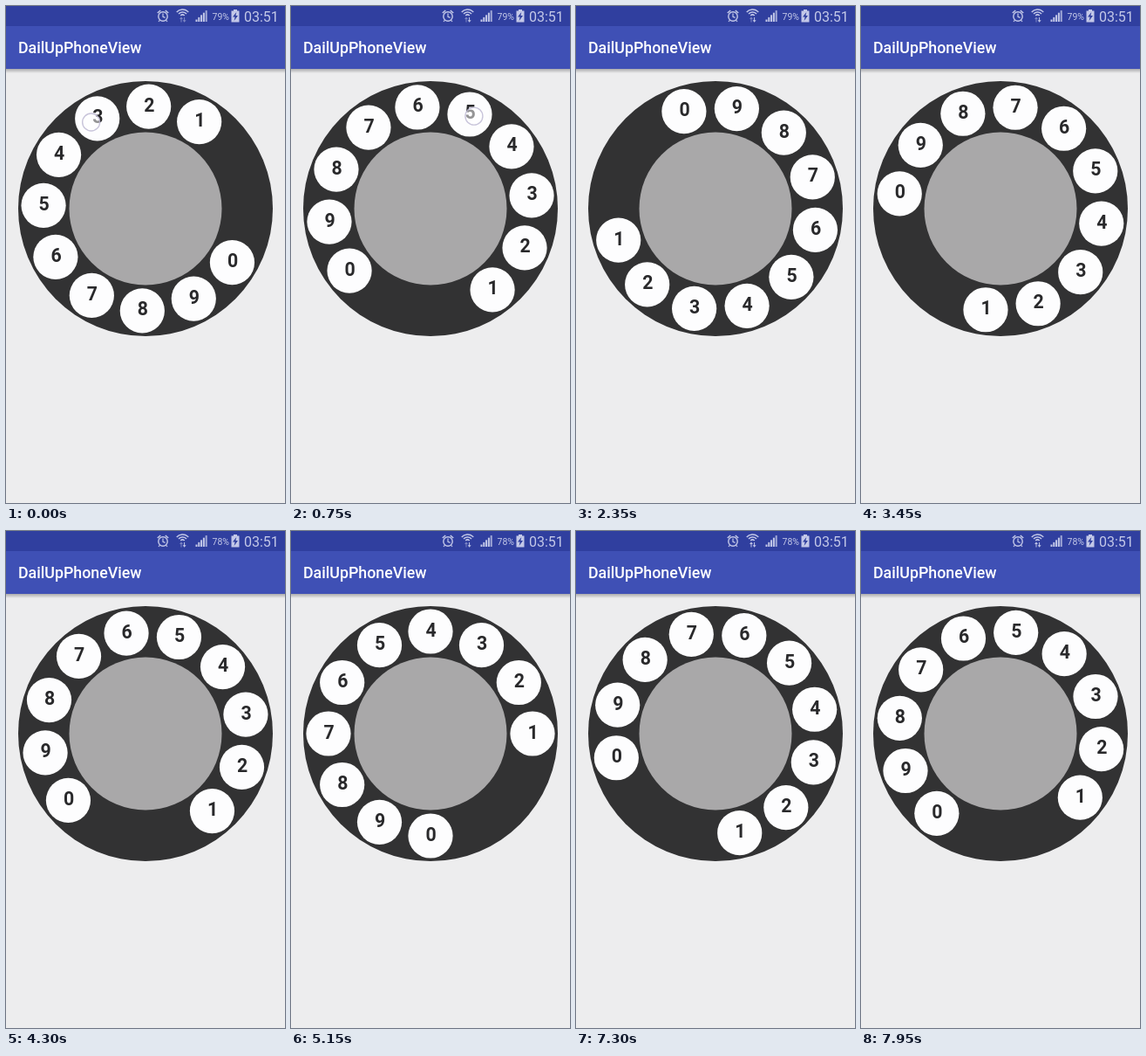
These frames come from a looping animation (320 by 569 pixels, 8 s). An HTML page with a canvas:

```html
<!DOCTYPE html>
<html lang="en">
<head>
<meta charset="utf-8">
<title>Rotary dial</title>
<style>
  html, body { margin: 0; height: 100%; overflow: hidden; background: #ededee; }
  canvas { display: block; width: 320px; height: 569px; }
</style>
</head>
<body>
<canvas></canvas>
<script>
const canvas = document.querySelector('canvas');
const ctx = canvas.getContext('2d');
const scale = window.devicePixelRatio || 1;
canvas.width = Math.round(320 * scale);
canvas.height = Math.round(569 * scale);

const LOOP = 8000, STEP = 50;
const CX = 160, CY = 232, ORBIT = 117;
const ICON = '#c3c8e8';
const RETURN = -57.87; // spring-back speed, degrees per second

// Dial rotation: [from ms, to ms, from deg, to deg, start speed, end speed]
const segments = [
  [0, 50, -58.2, -58.2, 0, 0],
  [50, 750, 0, 52.6, 30, 95],
  [750, 2050, 52.6, 173.6, 95, 40],
  [2050, 2150, 173.6, 173.6, 0, 0],
  [2150, 5150, 173.6, 0, RETURN, RETURN],
  [5150, 5700, 0, 0, 0, 0],
  [5700, 6550, 0, 94.9, 60, 125],
  [6550, 6700, 94.9, 111, 125, 60],
  [6700, 8000, 111, 35.8, RETURN, RETURN]
];

// The finger runs slightly ahead of the dial it drags.
const touches = [
  { from: 0, to: 2200, dragEnd: 2050, angle: -122.2, radius: 117 },
  { from: 5700, to: 6700, dragEnd: 6700, angle: -57.5, radius: 120 }
];

function rotationAt(t) {
  const [t0, t1, a, b, va, vb] = segments.find(s => t < s[1]);
  const d = (t1 - t0) / 1000, u = (t - t0) / (t1 - t0);
  const u2 = u * u, u3 = u2 * u;
  return (2 * u3 - 3 * u2 + 1) * a + (u3 - 2 * u2 + u) * d * va
       + (3 * u2 - 2 * u3) * b + (u3 - u2) * d * vb;
}

function polar(degrees, radius) {
  const a = degrees * Math.PI / 180;
  return [CX + radius * Math.cos(a), CY + radius * Math.sin(a)];
}

function rect(x, y, w, h, color) {
  ctx.fillStyle = color;
  ctx.fillRect(x, y, w, h);
}

function disc(x, y, r, color) {
  ctx.fillStyle = color;
  ctx.beginPath();
  ctx.arc(x, y, r, 0, 2 * Math.PI);
  ctx.fill();
}

function polygon(points, color) {
  ctx.fillStyle = color;
  ctx.beginPath();
  points.forEach(p => ctx.lineTo(...p));
  ctx.fill();
}

function line(points, width = 1.2, color = ICON) {
  ctx.strokeStyle = color;
  ctx.lineWidth = width;
  ctx.beginPath();
  points.forEach(p => ctx.lineTo(...p));
  ctx.stroke();
}

function arc(x, y, r, from, to, width) {
  ctx.strokeStyle = ICON;
  ctx.lineWidth = width;
  ctx.beginPath();
  ctx.arc(x, y, r, from * Math.PI, to * Math.PI);
  ctx.stroke();
}

function text(str, x, y, size, weight, color, align = 'left') {
  ctx.font = `${weight} ${size}px Roboto, sans-serif`;
  ctx.fillStyle = color;
  ctx.textAlign = align;
  ctx.fillText(str, x, y);
}

function drawStatusIcons(t) {
  // Alarm clock
  arc(180, 12, 5.2, 0, 2, 1.4);
  line([[180, 8.6], [180, 12.4], [182.6, 13.4]]);
  line([[173.8, 8], [177.2, 5]], 1.6);
  line([[182.8, 5], [186.2, 8]], 1.6);
  line([[176.6, 16], [175, 18]]);
  line([[183.4, 16], [185, 18]]);

  // Wi-Fi with traffic arrows
  arc(202.5, 13, 9, 1.23, 1.77, 1.5);
  arc(202.5, 13, 6, 1.23, 1.77, 1.5);
  arc(202.5, 13, 3, 1.23, 1.77, 1.5);
  const dim = '#7f88c5';
  const up = t < 6000 ? dim : ICON, down = t < 400 ? dim : ICON;
  line([[201, 18.5], [201, 14]], 1, up);
  polygon([[199, 15], [201, 12.5], [203, 15]], up);
  line([[204.6, 13], [204.6, 17]], 1, down);
  polygon([[202.6, 16.2], [204.6, 18.8], [206.6, 16.2]], down);

  // Signal bars
  for (let i = 0; i < 5; i++) {
    const h = 2.5 + i * 2.6;
    rect(217.5 + i * 2.8, 18 - h, 2, h, i < 4 ? ICON : '#a3aad8');
  }

  // Charging battery
  rect(261, 4, 4, 2, ICON);
  rect(258.5, 5.5, 9, 13, ICON);
  polygon([[264.3, 7], [260, 12.6], [262.6, 12.6], [261.6, 17], [266, 11], [263.4, 11]], '#303f9f');

  text(t < 4300 ? '79%' : '78%', 236.5, 16, 10.5, 400, ICON);
  text('03:51', 273, 18, 16, 400, ICON);
}

function drawChrome(t) {
  rect(0, 0, 320, 569, '#ededee');
  const shadow = ctx.createLinearGradient(0, 72, 0, 77);
  shadow.addColorStop(0, 'rgba(0,0,0,.28)');
  shadow.addColorStop(1, 'rgba(0,0,0,0)');
  rect(0, 72, 320, 5, shadow);
  rect(0, 0, 320, 72, '#3f50b5');
  rect(0, 0, 320, 23, '#303f9f');
  drawStatusIcons(t);
  text('DailUpPhoneView', 14, 54, 17.8, 500, '#fff');
}

function drawDial(t) {
  disc(CX, CY, 146, '#323233');
  disc(CX, CY, 87.5, '#a9a8a9');
  const rotation = rotationAt(t);
  for (let i = 0; i < 10; i++) {
    const [x, y] = polar(rotation - 30 * i, ORBIT);
    disc(x, y, 25.6, '#fdfdfe');
    text((i + 1) % 10, x + 0.6, y + 5.5, 21.3, 700, '#29292b', 'center');
  }
}

function drawTouch(t) {
  const touch = touches.find(p => t >= p.from && t < p.to);
  if (!touch) return;
  const lead = rotationAt(Math.min(t + 50, touch.dragEnd - 1));
  const [x, y] = polar(touch.angle + lead, touch.radius);
  disc(x, y, 10, 'rgba(255,255,255,.5)');
  ctx.strokeStyle = 'rgba(190,186,212,.85)';
  ctx.lineWidth = 1.4;
  ctx.beginPath();
  ctx.arc(x, y, 10, 0, 2 * Math.PI);
  ctx.stroke();
}

function frame() {
  const t = Math.floor(performance.now() % LOOP / STEP) * STEP;
  ctx.setTransform(scale, 0, 0, scale, 0, 0);
  drawChrome(t);
  drawDial(t);
  drawTouch(t);
  requestAnimationFrame(frame);
}
frame();
</script>
</body>
</html>
```
